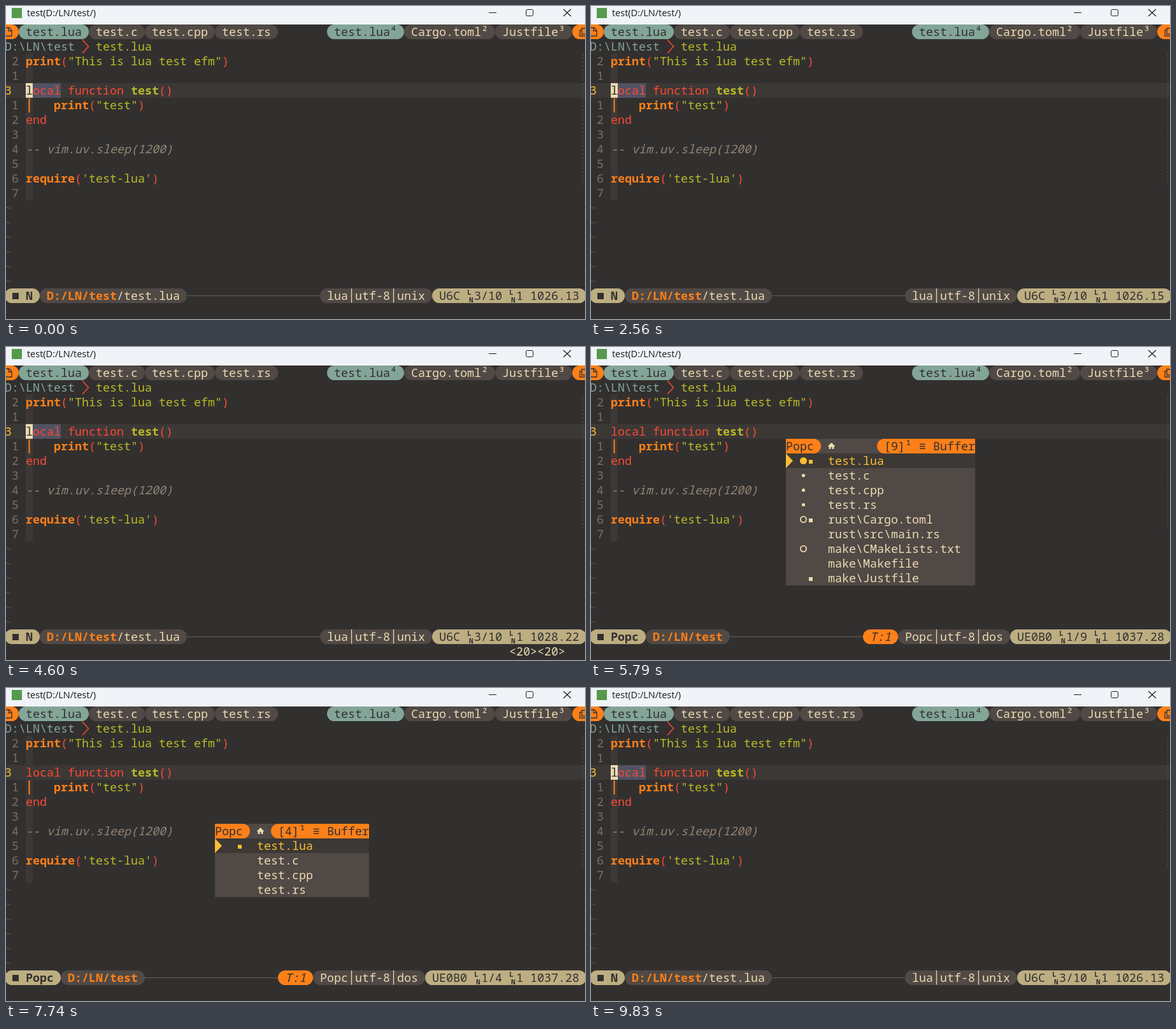
An HTML page with a canvas that plays this animation: 909 px wide and 491 px high, repeating every 9880 ms.

```html
<!DOCTYPE html>
<html lang="en">
<head>
<meta charset="utf-8">
<title>Editor buffers</title>
<style>
html, body { margin: 0; width: 100%; height: 100%; overflow: hidden; background: #32302f; }
canvas { display: block; }
</style>
</head>
<body>
<canvas id="stage" width="909" height="491"></canvas>
<script>
const g = document.getElementById('stage').getContext('2d');
const LOOP = 9880, CW = 11, RH = 23;
const X = col => col * CW - 2, Y = row => 29 + row * RH;
const BG = '#32302f', LINE = '#3c3836', GRAY = '#504945', MATCH = '#665c54',
  WORD = '#525263', TAN = '#bdae82', CREAM = '#ebdbb2', ORANGE = '#fe8019',
  TEAL = '#83a598', YELLOW = '#fabd2f';
// Markup: ^x switches colour; upper case is bold, c and i are italic.
const HUE = { w: CREAM, o: ORANGE, r: '#fb4934', g: '#b8bb26', y: YELLOW, b: TEAL,
  p: '#d3869b', a: '#8ec07c', c: '#928374', n: '#7c6f64', d: BG, i: BG, t: '#5a524c' };

const FILES = {
  lua: {
    name: 'test.lua', dir: 'D:\\LN\\test', tab: 0, cur: 2, total: 10, code: 'U6C', bar: 283,
    text: String.raw`^Oprint^r(^g"This is lua test efm"^r)

^rlocal function ^Gtest^r()
    ^Oprint^r(^g"test"^r)
^rend

^c-- vim.uv.sleep(1200)

^Orequire^r(^g'test-lua'^r)
`
  },
  c: {
    name: 'test.c', dir: 'D:\\LN\\test', tab: 0, cur: 2, total: 26, code: 'U69', bar: 302,
    text: String.raw`^a#include ^g<stdio.h>

^yint ^Gfib^r(^yint^r)^o;

^yint ^Gfib^r(^yint ^bn^r) {
    ^rif ^y(^wn ^o== ^p1 ^o|| ^wn ^o== ^p2^y)
        ^rreturn ^p1^o;

    ^yint ^wa ^o= ^p1^o, ^wb ^o= ^p1^o, ^wc^o;
    ^rfor ^y(int ^wk ^o= ^p3^o; ^wk ^o< ^wn^o; ^wk^o++^y) {
        ^wc ^o= ^wa ^o+ ^wb^o;
        ^wa ^o= ^wb^o;
        ^wb ^o= ^wc^o;
    ^y}
    ^rreturn ^wc^o;
^r}`
  },
  toml: {
    name: 'Cargo.toml', dir: 'D:\\LN\\test\\rust', tab: 1, cur: 0, total: 17, code: 'U5B', bar: 421,
    text: String.raw`^G[package]
^bname ^w= ^g"main"
^bversion ^w= ^g"0.1.0"
^bauthors ^w= [^g"rust"^w]
^bedition ^w= ^g"2021"

^c# See more keys and their definitions at https://doc.rust-lang.org/cargo/reference/manifest.html

^G[profile^w.^Gdev]
^bdebug ^w= ^ptrue

^G[workspace]
^bmembers ^w= [^g"add"^w]

^G[dependencies]
^badd ^w= {^bpath ^w= ^g"add"^w}`
  }
};

// Each item: two mark columns, then the label.
const POPUPS = {
  tab: { row: 8, col: 30, width: 22, title: '[4]¹ ≡ Buffer', pad: 4,
    items: [' ▪test.lua', '  test.c', '  test.cpp', '  test.rs'] },
  tabs: { row: 8, col: 30, width: 22, title: '[3]¹ ≡ Buffer', pad: 4,
    items: [' ▪test.lua⁴', '  Cargo.toml²', '  Justfile³'] },
  all: { row: 5, col: 28, width: 27, title: '[9]¹ ≡ Buffer', pad: 4,
    items: ['●▪test.lua', '• test.c', '• test.cpp', '• test.rs', '○▪rust\\Cargo.toml',
      '  rust\\src\\main.rs', '○ make\\CMakeLists.txt', '  make\\Makefile', ' ▪make\\Justfile'] },
  help: { row: 3, col: 5, width: 73, title: '[15]¹  ≡ Buffer', pad: 0, count: 15, tab: 2,
    items: [
      ['h,a,l', 'Pop buffers layer (h-Tab buffers, a-All buffers, l-Ta'],
      ['CR,Space', 'Load buffers (Space to stay in popc)'],
      ['s,S,v,V,t,T', 'Split or tabnew buffers (SVT to stay in popc)'],
      ['p', 'Show/hide full path of buffers'],
      ['g,G', 'Goto window contain the current buffer(G to stay in p'],
      ['c,C', 'Close one buffer (C to close all buffers of current t'],
      ['i,o', 'Switch to left/right(i/o) tab'],
      ['I,O', 'Move buffer or tab to the left/right(I/O)'],
      ['n', 'Set current tab name'],
      ['e', 'Edit a new file'],
      ['k/j', 'Operation up/down'],
      ['M-k,C-k/M-j,C-j', 'Operation page up/down'],
      ['K/J', 'Operation top/bottom'],
      ['q/Esc', 'Operation back/quit']
    ].map(([keys, what]) => '  ' + keys.padEnd(16) + '| ' + what) }
};

// start, file, cursor shown, clock, popup, pending keys
const STEPS = [
  [0, 'lua', 1, '1026.13'], [200, 'lua', 0, '1026.13'],
  [610, 'lua', 1, '1026.13'], [840, 'lua', 0, '1026.13'],
  [1140, 'c', 0, '1026.14'], [1250, 'c', 1, '1026.14'], [1500, 'c', 0, '1026.14'],
  [1910, 'lua', 1, '1026.15'], [2140, 'lua', 0, '1026.15'], [2560, 'lua', 1, '1026.15'],
  [2690, 'toml', 1, '1028.21'], [3360, 'toml', 0, '1028.21'],
  [3520, 'lua', 1, '1028.22'], [4240, 'lua', 0, '1028.22', '', '<20>'],
  [4410, 'lua', 0, '1028.22', '', '<20><20>'], [4600, 'lua', 1, '1028.22', '', '<20><20>'],
  [4850, 'lua', 1, '1037.28', 'tab'], [5540, 'lua', 0, '1037.28', 'tab'],
  [5790, 'lua', 0, '1037.28', 'all'], [6760, 'lua', 0, '1037.28', 'tabs'],
  [7740, 'lua', 0, '1037.28', 'tab'], [8860, 'lua', 0, '1037.28', 'help'],
  [9830, 'lua', 1, '1026.13']
];

function rect(color, x, y, w, h) {
  g.fillStyle = color;
  g.fillRect(x, y, w, h);
}

const cells = (color, col, row, w, h = 1) => rect(color, X(col), Y(row), w * CW, h * RH);

function pill(color, col, row, w) {
  g.fillStyle = color;
  g.beginPath();
  g.roundRect(X(col), Y(row), w * CW, RH, 11.5);
  g.fill();
}

function put(str, col, row, hue = 'w') {
  const setHue = h => {
    const low = h.toLowerCase();
    const style = 'ci'.includes(low) ? 'italic ' : '';
    g.font = style + (h !== low ? 'bold ' : '') + '18.3333px "Noto Sans Mono", monospace';
    g.fillStyle = HUE[low];
  };
  setHue(hue);
  for (let i = 0; i < str.length; i++) {
    if (str[i] === '^') setHue(str[++i]);
    else g.fillText(str[i], X(col++), Y(row) + 18);
  }
}

function stroke(color, width, points, dash = []) {
  g.strokeStyle = color;
  g.lineWidth = width;
  g.setLineDash(dash);
  g.beginPath();
  points.forEach(([x, y]) => g.lineTo(x, y));
  g.stroke();
}

function fillPoly(color, points) {
  g.fillStyle = color;
  g.beginPath();
  points.forEach(([x, y]) => g.lineTo(x, y));
  g.fill();
}

function titleBar() {
  const ink = '#1b1b1b';
  rect('#f0f4f9', 0, 0, 909, 29);
  rect('#569a4c', 9, 3, 16, 16);
  g.fillStyle = ink;
  g.font = '14.5px "Open Sans", sans-serif';
  g.fillText('test(D:/LN/test/)', 33, 16);
  stroke(ink, 1, [[758, 10.5], [770, 10.5]]);
  g.beginPath();
  g.roundRect(816.5, 5.5, 11, 10, 2);
  g.stroke();
  stroke(ink, 1.2, [[875, 5], [887, 16]]);
  stroke(ink, 1.2, [[887, 5], [875, 16]]);
}

function tabLine(file) {
  pill(ORANGE, -4, 0, 6);
  stroke(BG, 1.3, [[-1, 34], [5, 34], [9, 38], [9, 47], [-1, 47]]);
  stroke(BG, 1.3, [[4, 34], [4, 39], [9, 39]]);
  const tab = (name, col, on) => {
    pill(on ? TEAL : GRAY, col, 0, name.length + 2);
    put(name, col + 1, 0, on ? 'd' : 'w');
    return col + name.length + 2;
  };
  const names = file.tab ? ['Cargo.toml', 'main.rs'] : ['test.lua', 'test.c', 'test.cpp', 'test.rs'];
  names.reduce((col, name) => tab(name, col, name === file.name), 2);
  const groups = [(file.tab ? 'test.lua' : file.name) + '⁴', 'Cargo.toml²', 'Justfile³'];
  const width = groups.join('').length + 6;
  groups.reduce((col, name, i) => tab(name, col, i === file.tab), 81 - width);
  pill(ORANGE, 81, 0, 6);
  stroke(BG, 1.3, [[904, 38], [901, 38], [901, 47], [909, 47]]);
  stroke(BG, 1.3, [[909, 35], [904, 35], [904, 44], [909, 44]]);

  put(file.dir, 0, 1, 'b');
  const col = file.dir.length + 1, x = X(col), y = Y(1);
  stroke(file.tab ? '#c8643c' : HUE.r, 1.5, [[x + 1, y + 1], [x + 10.5, y + 11.5], [x + 1, y + 22]]);
  put(file.name, col + 2, 1, 'g');
}

function guide(col, from, to, solid) {
  const x = X(col) + 5.5;
  stroke(solid ? ORANGE : MATCH, 2, [[x, Y(from) + 1], [x, Y(to)]], solid ? [] : [3, 2.75]);
}

function editor(file, cursor, popup) {
  const lines = file.text.split('\n'), row = file.cur + 2;
  cells(LINE, 3, 2, 1, lines.length);
  rect(LINE, 0, Y(row), 909, RH);
  stroke(GRAY, 1.5, [[905.5, 75], [905.5, file.bar]], [3, 2.75]);
  if (file === FILES.lua) {
    if (!popup) cells(WORD, 3, row, 5);
    guide(3, 5, 6, true);
  } else if (file === FILES.c) {
    guide(3, 7, 17);
    guide(7, 8, 9);
    guide(7, 12, 15);
  } else {
    cells(MATCH, 3, row, 1);
    cells(MATCH, 11, row, 1);
  }
  lines.forEach((line, i) => {
    const off = Math.abs(i - file.cur);
    if (off) put(String(off).padStart(2), 0, i + 2, 'n');
    else put(String(i + 1), 0, i + 2, 'y');
    put(line, 3, i + 2);
  });
  for (let r = lines.length + 2; r < 18; r++) put('~', 0, r, 't');
  if (cursor && !popup) {
    cells(CREAM, 3, row, 1);
    put(lines[file.cur].replace(/\^./g, '')[0], 3, row, file.tab ? 'D' : 'd');
  }
}

function mark(ch, col, row, color) {
  const x = X(col) + 5.5, y = Y(row) + 11.5;
  if (ch === ' ') return;
  if (ch === '▪') return rect(color, x - 2.5, y - 1.5, 6, 6);
  g.beginPath();
  g.arc(x, y, ch === '●' ? 5.5 : ch === '○' ? 4.6 : 2.6, 0, 7);
  g.fillStyle = g.strokeStyle = color;
  g.lineWidth = 1.8;
  g.setLineDash([]);
  if (ch === '○') g.stroke(); else g.fill();
}

function drawPopup({ row, col, width, title, pad, items }, cursor) {
  cells(GRAY, col, row, width, items.length + 1);
  cells(ORANGE, col, row, 4);
  pill(ORANGE, col + 2, row, 3);
  put('Popc', col, row, 'd');
  const hx = X(col + 6) + 5.5, hy = Y(row) + 11;
  fillPoly(CREAM, [[hx - 6, hy + 1], [hx, hy - 5], [hx + 6, hy + 1], [hx + 4, hy + 1], [hx + 4, hy + 5],
    [hx + 1, hy + 5], [hx + 1, hy + 2], [hx - 1, hy + 2], [hx - 1, hy + 5], [hx - 4, hy + 5], [hx - 4, hy + 1]]);
  const right = col + width - title.length;
  pill(ORANGE, right - 1, row, 3);
  cells(ORANGE, right, row, title.length);
  put(title, right, row, 'd');

  const top = row + 1, x = X(col), y = Y(top);
  cells(LINE, col, top, width);
  if (cursor) cells(CREAM, col, top, 1);
  fillPoly(cursor ? BG : YELLOW, [[x, y], [x + 11, y + 11.5], [x, y + 23]]);
  items.forEach((item, i) => {
    const hue = i ? 'w' : 'y', r = top + i;
    mark(item[0], col + 2, r, HUE[hue]);
    mark(item[1], col + 3, r, HUE[hue]);
    put(item.slice(2), col + 2 + pad, r, hue);
  });
}

function statusLine(file, clock, popup) {
  const row = 18, y = Y(row);
  const mode = popup ? 'Popc' : 'N';
  const path = popup ? '' : file.dir.slice(10).replace('\\', '/') + '/' + file.name;
  const kind = popup ? 'Popc│utf-8│dos' : file.name.split('.')[1] + '│utf-8│unix';
  const pos = popup ? '1/' + (popup.count || popup.items.length) : file.cur + 1 + '/' + file.total;
  // '#' stands for the stacked line mark
  const info = `${popup ? 'UE0B0' : file.code} #${pos} #1 ${clock}`;

  stroke(MATCH, 1, [[100, y + 11.5], [600, y + 11.5]]);
  const left = mode.length + 4;
  rect(BG, 0, y, X(left + 12 + path.length), RH);
  pill(TAN, 0, row, left);
  rect(BG, 10, y + 7, 10, 10);
  put(mode, 3, row, 'D');
  pill(GRAY, left, row, path.length + 12);
  put('^OD:/LN/test^w' + path, left + 1, row);

  const infoCol = 82 - info.length, kindCol = infoCol - 2 - kind.length;
  rect(BG, X(kindCol - 1), y, 909, RH);
  pill(GRAY, kindCol - 1, row, kind.length + 2);
  put(kind, kindCol, row);
  pill(TAN, infoCol - 1, row, info.length + 2);
  put(info.replace(/#/g, ' '), infoCol, row, 'd');
  g.font = 'bold 11px "Noto Sans Mono", monospace';
  [...info].forEach((ch, i) => {
    if (ch !== '#') return;
    g.fillText('L', X(infoCol + i), y + 10);
    g.fillText('N', X(infoCol + i) + 3, y + 22);
  });
  if (popup) {
    pill(ORANGE, kindCol - 6, row, 5);
    put('T:' + (popup.tab || 1), kindCol - 5, row, 'i');
  }
}

function draw([, name, cursor, clock, popupName, keys = '']) {
  const file = FILES[name], popup = POPUPS[popupName];
  rect(BG, 0, 0, 909, 491);
  titleBar();
  tabLine(file);
  editor(file, cursor, popup);
  if (popup) drawPopup(popup, cursor);
  statusLine(file, clock, popup);
  put(keys, 72, 19);
}

let shown;
function tick() {
  const t = performance.now() % LOOP;
  const step = STEPS.findLast(s => s[0] <= t);
  if (step !== shown) draw(shown = step);
  requestAnimationFrame(tick);
}
tick();
</script>
</body>
</html>
```
